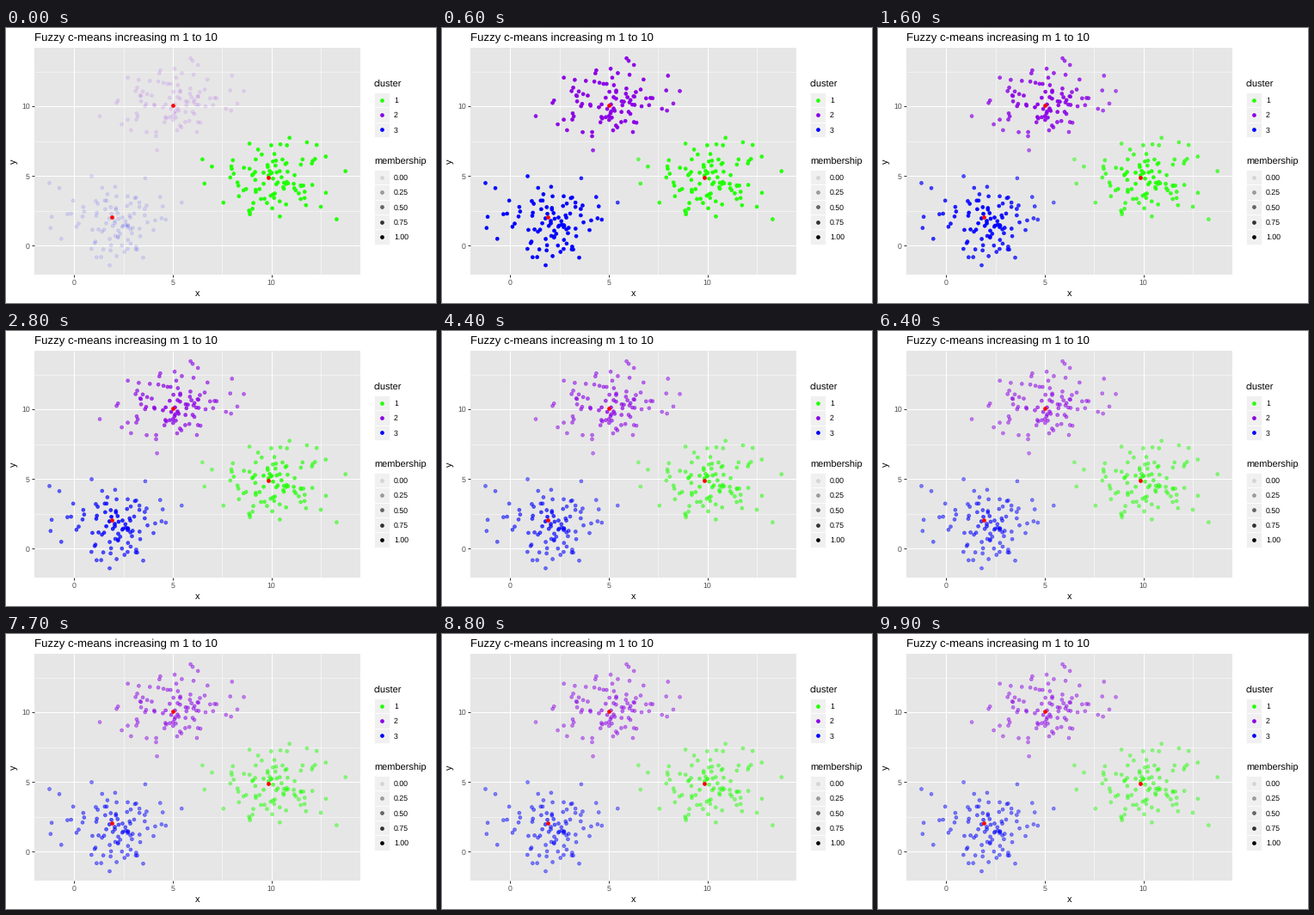
Recreate the animation shown at these times as a matplotlib script. Size 500 by 320 pixels, loop 10 s.

```python
import numpy as np
import matplotlib.pyplot as plt
from matplotlib.animation import FuncAnimation
from matplotlib.colors import to_rgba
from matplotlib.patches import Rectangle

W, H, DPI = 500, 320, 100
PT = 72 / DPI  # points per pixel
FRAMES, INTERVAL = 100, 100

COLORS = ["#21ff06", "#8b00e6", "#0000ff"]
RED, PANEL, KEY = "#ff0000", "#e6e6e6", "#f0f0f0"
LEFT, RIGHT, TOP, BOTTOM = 33, 412, 23, 287
X0, Y0, UX, UY = 79.2, 253.4, 22.95, 16.22

plt.rcParams["font.family"] = "Liberation Sans"
plt.rcParams["text.hinting"] = "none"

# Cluster centres and the stray points around them, in data units
CENTRES = np.array([(9.85, 4.9), (5, 10.05), (1.9, 2.05)])
STRAYS = [
    [(13.75, 5.35), (13.3, 1.9), (12.75, 6.4), (12.5, 2.8), (6.5, 6.2)],
    [(5.9, 13.45), (8.6, 11.1), (8, 12.2), (1.3, 9.3), (4.2, 6.85)],
    [(-1.25, 4.5), (5.45, 3.1), (1.8, -1.4), (-0.65, 0.5), (3.5, -0.85)],
]
SIZE, SPREAD = 100, 1.4


def cloud_around(rng, centre, strays):
    """Normal cloud with evenly spaced radius quantiles, plus its strays."""
    n = SIZE - len(strays)
    r = SPREAD * np.sqrt(-2 * np.log(1 - (np.arange(n) + 0.5) / SIZE))
    a = rng.uniform(0, 2 * np.pi, n)
    return np.vstack([centre + np.column_stack([r * np.cos(a), r * np.sin(a)]), strays])


rng = np.random.default_rng(12)
points = np.vstack([cloud_around(rng, c, s) for c, s in zip(CENTRES, STRAYS)])
group = np.repeat(np.arange(3), SIZE)
dist = np.linalg.norm(points[:, None] - CENTRES[None], axis=2)
own = dist[np.arange(len(points)), group]


def membership(m):
    """Fuzzy c-means membership of every point in its own cluster."""
    if m == 1:
        return (group == 0).astype(float)
    return 1 / ((own[:, None] / dist) ** (2 / (m - 1))).sum(axis=1)


def opacity(u):
    return 0.1 + 0.9 * u


def to_px(p):
    return (X0, Y0) + np.asarray(p) * (UX, -UY)


fig = plt.figure(figsize=(W / DPI, H / DPI), dpi=DPI, facecolor="white")
ax = fig.add_axes([0, 0, 1, 1])
ax.set_xlim(0, W)
ax.set_ylim(H, 0)
ax.axis("off")


def text(x, y, s, size, color="black", **kw):
    ax.text(x, y, s, fontsize=size * PT, color=color, **kw)


def line(xs, ys, color, width):
    ax.plot(xs, ys, color=color, lw=width * PT, solid_capstyle="butt", zorder=1)


def box(x, y, w, h, fill, edge="none"):
    ax.add_patch(Rectangle((x, y), w, h, fc=fill, ec=edge, lw=0.8 * PT, zorder=0))


def dots(xy, color, z=3):
    x, y = np.atleast_2d(xy).T
    return ax.scatter(x, y, s=(3.9 * PT) ** 2, facecolors=color, edgecolors=color,
                      linewidths=0.7 * PT, zorder=z)


def grid(x, y, width):
    line([x, x], [TOP, BOTTOM], "white", width)
    line([LEFT, RIGHT], [y, y], "white", width)


def legend(title, y, entries):
    text(428, y, title, 11)
    for i, (label, color) in enumerate(entries):
        cy = y + 14.8 + 17.28 * i
        box(428.4, cy - 8.64, 17.28, 17.28, KEY, "white")
        dots((436.8, cy), [color])
        text(451, cy + 3.2, label, 8.8)


# Panel, grid and axes
box(LEFT, TOP, RIGHT - LEFT, BOTTOM - TOP, PANEL)
for v in (2.5, 7.5, 12.5):
    grid(*to_px((v, v)), 0.5)
for v in (0, 5, 10):
    x, y = to_px((v, v))
    grid(x, y, 1)
    line([x, x], [BOTTOM, BOTTOM + 2.75], "#333333", 1)
    line([LEFT - 2.75, LEFT], [y, y], "#333333", 1)
    text(x, 299, str(v), 8.8, "#4d4d4d", ha="center")
    text(28, y + 3.2, str(v), 8.8, "#4d4d4d", ha="right")

text(33, 15, "Fuzzy c-means increasing m 1 to 10", 13.2)
text(222.5, 312, "x", 11, ha="center")
text(15, 155.5, "y", 11, rotation=90, ha="right", va="center")

legend("cluster", 69, zip("123", COLORS))
legend("membership", 159,
       [(f"{u:.2f}", (0, 0, 0, opacity(u))) for u in np.linspace(0, 1, 5)])

rgba = np.array([to_rgba(c) for c in COLORS])[group]
cloud = dots(to_px(points), rgba)
dots(to_px(CENTRES), RED, z=4)


def update(i):
    rgba[:, 3] = opacity(membership(1 + i / 11))
    cloud.set_facecolors(rgba)
    cloud.set_edgecolors(rgba)
    return (cloud,)


anim = FuncAnimation(fig, update, frames=FRAMES, interval=INTERVAL,
                     repeat=True, repeat_delay=0, blit=False)
plt.show()
```
